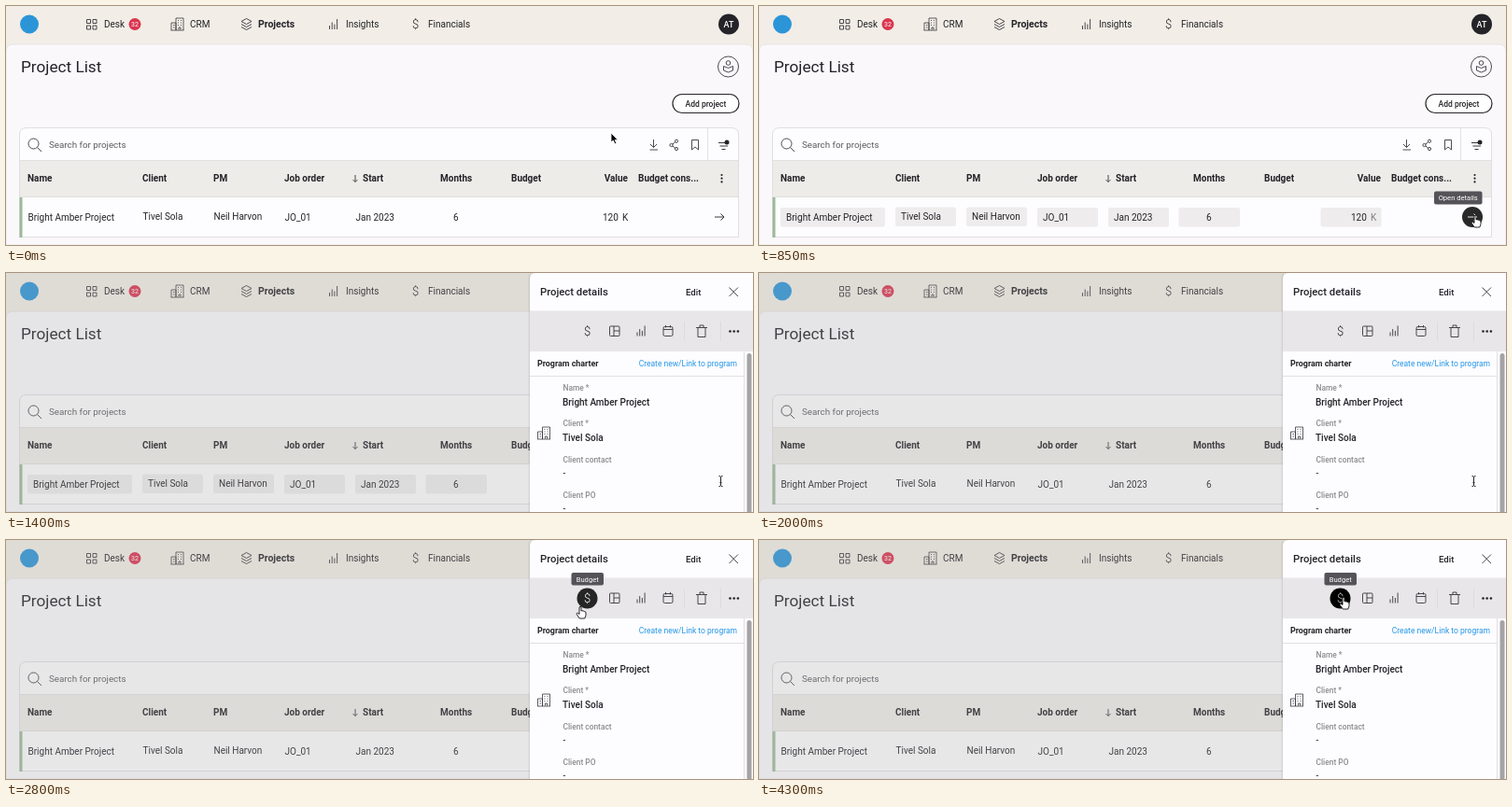
Write an HTML page that moves like this. It is 800 px wide and 256 px high and loops after 4350 ms.

```html
<!DOCTYPE html>
<html lang="en">
<head>
<meta charset="utf-8">
<title>Project list</title>
<style>
  html, body { margin: 0; width: 100%; height: 100%; overflow: hidden; }
  svg { display: block; width: 800px; height: 256px; }
  text { font: 10px Roboto, Inter, sans-serif; fill: #242328; white-space: pre; }
  .b, .b text { font-weight: 700; }
  .m, .m text { font-weight: 500; }
  .label text { font-size: 8.4px; font-weight: 500; fill: #8d8b8f; }
  .icon { fill: none; stroke: #38363b; stroke-width: .9; }
  .tip text { font-size: 7.6px; fill: #fff; text-anchor: middle; }
  .tip rect { fill: #555358; }
  .dollar { font-size: 13px; font-weight: 300; text-anchor: middle; }
</style>
</head>
<body>
<svg viewBox="0 0 800 256">
  <defs>
    <path id="building" class="icon" style="stroke-width:.8" d="M0 13.5V5.5H5V13.5M5 13.5V.5H13V13.5M-.5 13.5H13.5M2 8H3.5M2 10.5H3.5M7 3H8M10 3H11M7 5.5H8M10 5.5H11M7 8H8M10 8H11M8 13V10.5H10V13"/>
    <path id="bars" class="icon" d="M.5 11V7M3.2 11V3.5M5.9 11V5.500M8.600 11V0"/>
    <filter id="shade" x="-10%" width="120%"><feGaussianBlur stdDeviation="1.5"/></filter>
  </defs>

  <rect width="800" height="256" fill="#f2ede6"/>
  <path d="M0 256V49Q0 41 8 41H792Q800 41 800 49V256Z" fill="#faf8fb" stroke="#e9e5e3"/>

  <circle cx="25" cy="19.5" r="10" fill="#2b95d8"/>
  <path class="icon" d="M86.500 14.500h4v4h-4zM93 14.500h4v4h-4zM86.500 21h4v4h-4zM93 21h4v4h-4z"/>
  <use href="#building" x="177" y="12.5"/>
  <path class="icon" d="M252 16.500L257.500 13.500L263 16.500L257.500 19.500ZM252 19.500L257.500 22.500L263 19.500M252 22.500L257.500 25.500L263 22.500"/>
  <use href="#bars" x="346" y="14"/>
  <text class="dollar" x="438.5" y="24">$</text>
  <text x="105" y="23">Desk</text>
  <text x="197" y="23">CRM</text>
  <text x="364" y="23">Insights</text>
  <text x="452" y="23">Financials</text>
  <text class="b" x="270" y="23" style="font-size:10.5px">Projects</text>
  <circle cx="138" cy="19.5" r="6.500" fill="#da3550"/>
  <text x="138" y="22" text-anchor="middle" style="font-size:7px;fill:#fff">32</text>
  <circle cx="774" cy="19.5" r="11" fill="#242328"/>
  <text class="m" x="774" y="22.700" text-anchor="middle" style="font-size:9px;fill:#fff">AT</text>

  <text x="16" y="70.500" style="font-size:17.2px">Project List</text>
  <g class="icon">
    <circle cx="773.5" cy="65" r="11"/>
    <circle cx="773.5" cy="61" r="2.300"/>
    <path d="M768.500 64.500L773.500 66.500L778.500 64.500V69L773.500 71L768.500 69Z"/>
  </g>
  <rect x="714" y="94.500" width="71" height="20" rx="10" fill="#fff" stroke="#29272c" stroke-width="1.2"/>
  <text class="m" x="749.500" y="107.700" text-anchor="middle" style="font-size:8.5px">Add project</text>

  <path d="M14.500 247.500V138Q14.500 130.500 22 130.500H777Q784.500 130.500 784.500 138V247.500Z" fill="#fdfcfe" stroke="#e0dee0"/>
  <path d="M15 166H784V204H15Z" fill="#eeece9"/>
  <path d="M15 165.500H784M15 204.500H784M751.500 131V166" stroke="#e2e0e0"/>
  <path d="M14.500 205H17.500V248H14.500Z" fill="#9dba9b"/>
  <text x="46" y="152" style="font-size:9.8px;fill:#5d5b60">Search for projects</text>
  <g class="icon">
    <circle cx="29.500" cy="147.500" r="5.500"/>
    <path d="M33.500 151.500L38 156M693.500 143V151.500M690 148L693.500 151.500L697 148M689.500 154H698"/>
    <circle cx="718" cy="144.700" r="1.600"/><circle cx="712.500" cy="149" r="1.600"/><circle cx="718" cy="153" r="1.600"/>
    <path d="M713.900 148L716.700 145.700M713.900 150L716.700 152.200M734.500 143.500H741.500V154L738 151L734.500 154Z"/>
    <path d="M763 146.500H774M764.500 150H773M766.500 153.500H770.500" style="stroke-width:1.2"/>
    <path d="M374 181V188.500M371.500 186L374 188.500L376.500 186"/>
  </g>
  <circle cx="772" cy="146" r="2.500" fill="#242328"/>
  <g fill="#242328"><circle cx="766.500" cy="181" r="1.100"/><circle cx="766.500" cy="184.700" r="1.100"/><circle cx="766.500" cy="188.400" r="1.100"/></g>
  <g class="b">
    <text x="23" y="188">Name</text><text x="146" y="188">Client</text>
    <text x="222" y="188">PM</text><text x="298" y="188">Job order</text>
    <text x="382" y="188">Start</text><text x="465" y="188">Months</text>
    <text x="541" y="188">Budget</text><text x="666" y="188" text-anchor="end">Value</text>
    <text x="677" y="188">Budget cons...</text>
  </g>
  <g id="row"></g>

  <circle id="open" cx="764" cy="226" r="11"/>
  <path id="openIcon" class="icon" d="M759 226H769M765.500 222.500L769 226L765.500 229.500"/>
  <g id="openTip" class="tip">
    <rect x="723" y="198.500" width="51.500" height="14" rx="2"/>
    <text x="748.700" y="208.200">Open details</text>
  </g>

  <g id="panel">
    <rect width="800" height="256" fill="#a3a3a3" opacity=".24"/>
    <rect x="561" y="2" width="245" height="260" opacity=".2" filter="url(#shade)"/>
    <path d="M561 256V6Q561 0 567 0H800V256Z" fill="#fdfcfe"/>
    <rect x="561" y="40.500" width="239" height="43.500" fill="#e8e6e8"/>
    <path d="M561 110.500H791M790.500 84V256" stroke="#e1dfe2"/>
    <rect x="793.500" y="86" width="5" height="180" rx="2.500" fill="#a4a2a5"/>
    <text class="m" x="572" y="24" style="font-size:11.3px">Project details</text>
    <text class="m" x="728" y="23.500" style="font-size:9.6px">Edit</text>
    <g class="icon">
      <path d="M774.500 15.500L784 25M784 15.500L774.500 25"/>
      <rect x="646.500" y="57" width="10.500" height="10.500" rx="1"/>
      <path d="M651 57V67.500M651 62H657"/>
      <rect x="704" y="57.500" width="10" height="10" rx="1.500"/>
      <path d="M704 60.500H714M706.500 56V58.500M711.500 56V58.500"/>
      <path d="M739 58.500H751M741 58.500V68.500H749V58.500M743 58.500V56H747V58.500"/>
    </g>
    <path d="M726.500 52V73M765.500 52V73" stroke="#dddbdd"/>
    <use href="#bars" x="675.500" y="56.500"/>
    <g fill="#242328"><circle cx="775.500" cy="62.500" r="1.300"/><circle cx="779.700" cy="62.500" r="1.300"/><circle cx="783.900" cy="62.500" r="1.300"/></g>
    <text class="b" x="569" y="100" style="font-size:8.9px">Program charter</text>
    <text x="783" y="100" text-anchor="end" style="font-size:8.5px;fill:#2196e8">Create new/Link to program</text>
    <g class="label">
      <text x="596.500" y="126">Name *</text><text x="596.500" y="164">Client *</text>
      <text x="596.500" y="202.500">Client contact</text><text x="596.500" y="241">Client PO</text>
    </g>
    <g class="m">
      <text x="596" y="141.700">Bright Amber Project</text><text x="596" y="180">Tivel Sola</text>
    </g>
    <text x="596.500" y="218">-</text><text x="596.500" y="256">-</text>
    <use href="#building" x="569.500" y="164.500"/>
    <circle id="budget" cx="622.500" cy="62.500" r="11"/>
    <text id="budgetIcon" class="dollar" x="622.500" y="67">$</text>
    <g id="budgetTip" class="tip">
      <rect x="605.500" y="35" width="34.500" height="13.500" rx="2"/>
      <text x="622.700" y="44.500">Budget</text>
    </g>
  </g>

  <g id="cursor">
    <path id="arrow" d="M0 0V10L2.300 8L4 11.700L5.700 11L4.100 7.400H7.200Z" fill="#000" stroke="#fff" stroke-width=".8"/>
    <path id="hand" d="M-1 1Q0-.6 1 1V5Q2 4 3 5.200Q4 4.600 4.700 5.700Q6 5.400 6 7V9.500L4.800 13H-.8L-3.800 8.500Q-4 6.800-2.500 7.300L-1 8.500Z" fill="#fff" stroke="#111" stroke-width=".9"/>
    <path id="beam" d="M-2-5.500Q0-5.500 0-4.500Q0-5.500 2-5.500M0-4.500V4.500M-2 5.500Q0 5.500 0 4.500Q0 5.500 2 5.500M-1 1.500H1" fill="none" stroke="#222"/>
  </g>
</svg>
<script>
const LOOP = 4350, STEP = 50;
const $ = id => document.getElementById(id);
const ramp = (t, a, b) => Math.min(1, Math.max(0, (t - a) / (b - a)));
const ease = u => u * u * (3 - 2 * u);
const fade = (t, a, b) => ease(ramp(t, a, b));

// label, text x, baseline, chip x, chip width, shift when hovered
const cells = [
  ['Bright Amber Project', 23.5, 229.5, 23, 112, 5.5],
  ['Tivel Sola', 146.5, 229, 146, 65, 5.5],
  ['Neil Harvon', 222.5, 229, 222, 65, 5.5],
  ['JO_01', 298.5, 229.5, 298, 65, 5.5],
  ['Jan 2023', 374.5, 229.5, 374, 65, 5.5],
  ['6', 479, 229.5, 449.5, 65.5, 0],
  ['120', 639, 229.5, 601.5, 65, -5]
];
$('row').innerHTML = cells.map(([s, x, y, cx, w]) =>
  `<rect class="chip" x="${cx}" y="${y - 13.5}" width="${w}" height="20.5" rx="2" fill="#eeecec"/>
   <text class="cell" x="${x}" y="${y}">${s}</text>`).join('') +
  '<text id="unit" x="660" y="229.5">K</text>';
const chips = document.querySelectorAll('.chip');
const texts = document.querySelectorAll('.cell');

// time, x, y of the pointer
const path = [
  [0, 648, 136], [400, 737, 200], [500, 755, 212], [650, 766, 223], [800, 767, 224],
  [1350, 767, 224], [1400, 765.5, 223], [2050, 765.5, 223], [2350, 692, 145],
  [2650, 618, 75], [2800, 615, 71], [3100, 626, 61], [LOOP, 626, 61]
];
function pointer(t) {
  const i = path.findIndex(p => p[0] > t);
  const [t0, x0, y0] = path[i - 1], [t1, x1, y1] = path[i];
  const u = (t - t0) / (t1 - t0);
  return [x0 + (x1 - x0) * u, y0 + (y1 - y0) * u];
}

function button(id, hover, press, tip) {
  $(id).style.opacity = hover * (0.84 + 0.16 * press);
  const v = 36 + 219 * hover * (1 - 0.3 * press);
  const color = `rgb(${v},${v},${v})`;
  const icon = $(id + 'Icon');
  icon.style[icon.tagName === 'text' ? 'fill' : 'stroke'] = color;
  $(id + 'Tip').style.opacity = tip;
}

function draw(t) {
  const hover = fade(t, 400, 530) - fade(t, 1400, 1600);
  chips.forEach(c => c.style.opacity = hover);
  texts.forEach((el, i) => el.setAttribute('x', cells[i][1] + cells[i][5] * hover));
  $('unit').setAttribute('x', 660 - 5 * hover);
  $('unit').style.opacity = 1 - 0.45 * hover;

  button('open', fade(t, 560, 720), fade(t, 1120, 1300), fade(t, 700, 850));
  button('budget', fade(t, 2560, 2700), fade(t, 3350, 3600), fade(t, 2600, 2750));
  const opened = t >= 1400;
  $('panel').style.display = opened ? '' : 'none';

  const [x, y] = pointer(t);
  $('cursor').setAttribute('transform', `translate(${x} ${y})`);
  const hand = opened ? t >= 2600 : t >= 600;
  const beam = opened && y > 112;
  $('hand').style.display = hand ? '' : 'none';
  $('beam').style.display = beam ? '' : 'none';
  $('arrow').style.display = hand || beam ? 'none' : '';
}

const start = performance.now();
function tick() {
  const t = (performance.now() - start) % LOOP;
  draw(Math.floor(t / STEP) * STEP);
  requestAnimationFrame(tick);
}
tick();
</script>
</body>
</html>
```
